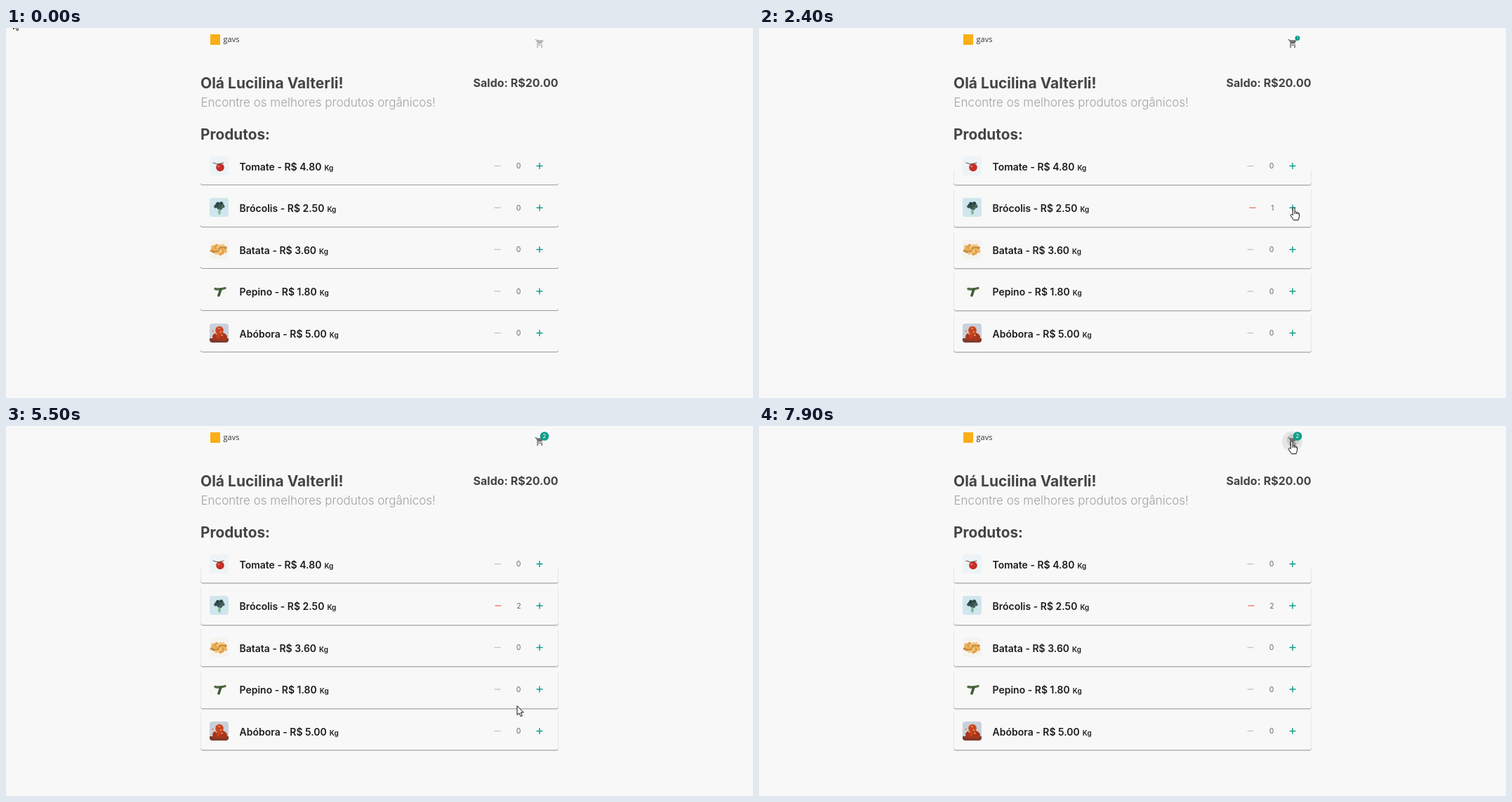
Recreate the animation shown at these times as an HTML page. Size 1064 by 527 pixels, loop 8000 ms.

```html
<!DOCTYPE html>
<html lang="pt">
<head>
<meta charset="utf-8">
<title>Loja</title>
<style>
html, body { margin: 0; width: 100%; height: 100%; overflow: hidden; background: #f8f8f8; }
svg { display: block; }
text { font-family: Inter, sans-serif; }
.head { font-weight: 700; fill: #444; }
.sub { font-size: 17px; fill: #a2a2a2; font-weight: 300; }
.brand { font: 11px "Open Sans", sans-serif; fill: #333; }
.item { font-size: 14px; font-weight: 600; fill: #1d1d1d; }
.unit { font-size: 10px; }
.qty { font-size: 10.5px; fill: #666; text-anchor: middle; }
.count { font-size: 8px; fill: #fff; text-anchor: middle; }
.line { fill: none; stroke: #9b9b9b; }
.side { fill: none; stroke: #e6e6e6; }
.shade { stroke: #d2d2d2; visibility: hidden; }
.raised .line { stroke: #b4b4b4; }
.raised .shade { visibility: visible; }
svg:not(.raised) .side { visibility: hidden; }
</style>
</head>
<body>
<svg id="stage" width="1064" height="527" viewBox="0 0 1064 527"></svg>
<script>
const ROW = 59.5, LOOP = 8000, TEAL = '#0f9d8a', OFF = '#c2c2c2';

const circle = (x, y, r, fill) => `<circle cx="${x}" cy="${y}" r="${r}" fill="${fill}"/>`;
const box = fill => `<rect width="27" height="27" fill="${fill}"/>`;
const stroke = (d, color, width) =>
  `<path d="${d}" fill="none" stroke="${color}" stroke-width="${width}" stroke-linecap="round"/>`;

// n dots on a golden-angle spiral inside an ellipse
function heap(n, cx, cy, rx, ry, r, colors) {
  let out = '';
  for (let i = 0; i < n; i++) {
    const d = Math.sqrt((i + .5) / n), a = i * 2.4;
    out += circle(cx + rx * d * Math.cos(a), cy + ry * d * Math.sin(a), r, colors[i % colors.length]);
  }
  return out;
}

const items = [
  ['Tomate - R$ 4.80', box('#edf3f6') + circle(15, 15.5, 5.8, '#c42f28') + circle(13, 14, 1.6, '#e4695c')
    + stroke('M5 9L12 11 20 9', '#5b4a43', 1)],
  ['Brócolis - R$ 2.50', box('#d0e6ed') + stroke('M14 14V22', '#7fb897', 3.5)
    + heap(12, 14, 11, 6.5, 4, 2.4, ['#34504c', '#2b4246', '#47635a'])],
  ['Batata - R$ 3.60', box('#f6f3ee') + heap(34, 13.5, 13.5, 11.5, 7, 2, ['#e0a04a', '#eeb65c', '#c98a3c', '#f3c77c'])],
  ['Pepino - R$ 1.80', box('#f7f8f6') + stroke('M8 10.5Q15 12 22 9.5', '#526b43', 3.4) + stroke('M16 11L13 20', '#40583a', 3.6)],
  ['Abóbora - R$ 5.00', box('#c9d0da') + stroke('M0 24H27', '#7d3a2c', 6) + circle(14, 9.5, 5.8, '#c8451f')
    + heap(4, 14, 18, 10, 2, 5.4, ['#c4431e', '#a8351a']) + heap(5, 13, 12, 9, 7, 1.3, ['#ea8a5e'])]
];

function row([label, photo], i) {
  const dy = i * ROW, mid = 196.5 + dy, base = Math.round(223 + i * 59.6) + .5;
  const edge = top => `M277.5 ${top}V${base - 2}q0 2 2 2H784.5q2 0 2-2V${top}`;
  return `<path class="side" d="${edge(Math.max(203, base - 53))}"/>
    <path class="shade" d="M279 ${base + 1}H785.5"/>
    <path class="line" d="${edge(base - 2)}"/>
    <g transform="translate(290 ${Math.round(182.6 + dy)})" clip-path="url(#thumb)">${photo}</g>
    <text class="item" x="332.5" y="${202.6 + dy}">${label}<tspan class="unit" dx="4">Kg</tspan></text>
    <path id="minus${i}" d="M695.5 ${mid}h9" stroke="${OFF}" stroke-width="1.3"/>
    <text id="qty${i}" class="qty" x="730" y="${200.2 + dy}">0</text>
    <path d="M755.5 ${mid}h9m-4.5-4.5v9" stroke="${TEAL}" stroke-width="1.4"/>`;
}

const stage = document.getElementById('stage');
stage.innerHTML = `
  <defs><clipPath id="thumb"><rect width="27" height="27" rx="4"/></clipPath></defs>
  <rect x="291" y="9" width="14" height="15" fill="#fbae17"/>
  <text class="brand" x="309.5" y="20">gavs</text>
  <text class="head" x="277" y="86" font-size="21">Olá Lucilina Valterli!</text>
  <text class="head" x="786.5" y="84.3" font-size="16" text-anchor="end">Saldo: R$20.00</text>
  <text class="sub" x="277.5" y="112">Encontre os melhores produtos orgânicos!</text>
  <text class="head" x="277" y="159" font-size="20.8">Produtos:</text>
  ${items.map(row).join('')}
  <circle id="hover" cx="759.5" cy="22" r="14.5" fill="#e6e6e6"/>
  <circle id="press" cx="760.5" cy="20" fill="#bcbcbc" opacity=".6"/>
  <circle id="ripple" cx="760" cy="256" fill="${TEAL}"/>
  <path id="cart" transform="translate(752.9 14.8) scale(.6)" d="M7 18a2 2 0 1 0 0 4 2 2 0 0 0 0-4zM1 2v2h2l3.6 7.6-1.35 2.44C4.5 15.4 5.5 17 7 17h12v-2H7.4l-.2-.4.9-1.6h7.45c.75 0 1.41-.41 1.75-1.03L20.9 5.5A1 1 0 0 0 20 4H5.2l-.94-2zM17 18a2 2 0 1 0 0 4 2 2 0 0 0 0-4z"/>
  <g id="badge"><circle r="6.3" fill="${TEAL}"/><text id="count" class="count" y="2.9"></text></g>
  <g fill="#fff" stroke="#111" stroke-linejoin="round">
    <path id="arrow" d="M.5 .5V13.6L3.5 10.8 5.6 15.6 7.8 14.7 5.7 10H9.7Z"/>
    <path id="hand" d="M3.8 11.5V2.2Q3.8.6 5.2.6T6.6 2.2V7.2Q8.6 5.8 9 7.8 11 6.8 11.2 8.6 13 8 13 10V13.8L11.6 18.6H5L1 12.6Q.3 10.6 2 10.4ZM6.6 7.2V10M9 7.8V10M11.2 8.6V10.4"/>
  </g>`;

// pointer strokes: start and end in ticks of 100 ms, bend, goal
const home = [10, -12], plus = [761, 255], cart = [758, 21];
const moves = [
  [3, 11, [1050, 640], [659, 310]],
  [13, 17, [710, 270], [777, 253]],
  [18, 19, plus, plus],
  [50, 55, [752, 335], [727.5, 398]],
  [56, 65, [505, 540], [665, 76]],
  [65, 67, [690, 58], [724, 37]],
  [68, 72, [740, 32], cart]
];

function pointer(tick) {
  let from = home;
  for (const [start, end, bend, to] of moves) {
    if (tick <= start) break;
    if (tick < end) {
      const u = Math.sin((tick - start) / (end - start) * Math.PI / 2);
      return from.map((p, k) => (1 - u) ** 2 * p + 2 * u * (1 - u) * bend[k] + u * u * to[k]);
    }
    from = to;
  }
  return from;
}

const get = id => document.getElementById(id);
const set = (id, attrs) => Object.entries(attrs).forEach(([k, v]) => get(id).setAttribute(k, v));
const near = ([x, y], [tx, ty]) => Math.hypot(x - tx, y - ty) < 12;

function draw(tick) {
  const tip = pointer(tick), onCart = near(tip, cart), isHand = onCart || near(tip, plus);
  set('hand', { transform: `translate(${tip[0] - 4.5} ${tip[1]})`, opacity: +isHand });
  set('arrow', { transform: `translate(${tip})`, opacity: +!isHand });
  set('hover', { opacity: +onCart });
  stage.classList.toggle('raised', tick >= 19);

  // a narrower digit lets the minus sign move right
  const qty = (tick >= 24) + (tick >= 31), shift = qty && 5 - 2 * qty;
  set('minus1', { transform: `translate(${shift} 0)`, stroke: qty ? '#ef6f63' : OFF });
  set('qty1', { x: 730 + shift / 2 });
  get('qty1').textContent = get('count').textContent = qty;
  set('cart', { fill: qty ? '#707070' : '#b4b4b4' });

  const grow = qty && Math.min(1, .55 + (tick - 24) * .25);
  set('badge', { transform: `translate(767 14.5) scale(${grow})` });

  const age = tick - 31;
  set('ripple', { r: Math.max(0, Math.min(14, 6 + age * 4)), opacity: age < 0 ? 0 : Math.max(0, .12 - age * .024) });
  set('press', { r: Math.max(0, tick - 76) * 3 });
}

const start = performance.now();
function frame() {
  draw(Math.floor((performance.now() - start) % LOOP / 100));
  requestAnimationFrame(frame);
}
frame();
</script>
</body>
</html>
```
